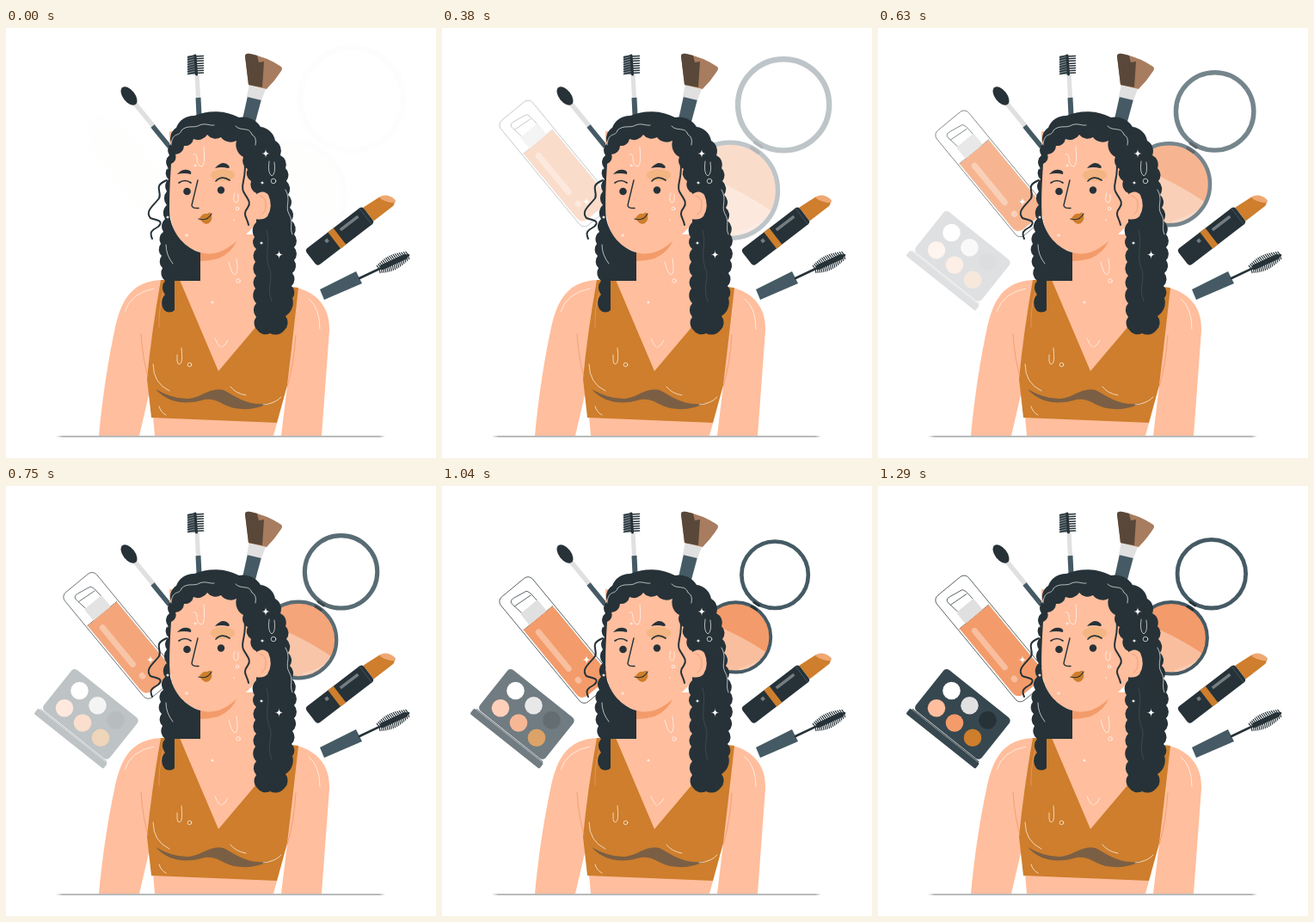
Write an HTML page that moves like this. It is 500x500 px and loops after 1.33 s.

```html
<!DOCTYPE html>
<html lang="en">
<head>
<meta charset="utf-8">
<title>Makeup</title>
<style>
html, body { margin: 0; height: 100%; overflow: hidden; background: #fff }
svg { display: block; width: 100vw; height: 100vh }
.line { fill: none; stroke: #263238; stroke-linecap: round; stroke-linejoin: round }
.wet { fill: none; stroke: #fff; stroke-width: .9; stroke-linecap: round; opacity: .75 }
.fold { fill: none; stroke: #eb996e; stroke-width: .8; stroke-linecap: round }
.ink { fill: #263238 } .steel { fill: #455a64 } .silver { fill: #e0e0e0 }
.skin { fill: #ffbe9d } .coral { fill: #f39b6a } .gold { fill: #ce7e2c }
</style>
</head>
<body>
<svg viewBox="0 0 500 500">
<defs><clipPath id="pan"><circle cx="341" cy="177" r="42"/></clipPath></defs>

<g id="compact">
  <circle cx="388" cy="102" r="40" fill="#fff" stroke="#455a64" stroke-width="4.800"/>
  <circle cx="341" cy="177" r="42" class="coral"/>
  <g clip-path="url(#pan)" fill="#fff">
    <path d="M300 157Q345 171 390 204V230H300Z" opacity=".35"/>
    <path d="M345 214Q370 208 390 188V230H340Z" opacity=".2"/>
  </g>
  <circle cx="341" cy="177" r="42" fill="none" stroke="#455a64" stroke-width="4"/>
  <path class="line" d="M363 135l6 4M360 140l6 4" stroke-width="3"/>
</g>

<g id="bottle">
  <g transform="translate(64 131.500) rotate(-39.500)">
    <rect width="48" height="158" rx="7" fill="#fff" stroke="#263238" stroke-width=".7"/>
    <path class="line" d="M2 46H46M13 29L11 14Q11 9 17 10L33 13Q36 14 36 29M12 18L34 20" stroke-width=".7"/>
    <rect x="11" y="29" width="26" height="17" rx="2" class="silver"/>
    <path class="coral" d="M2 46H46V142Q46 152 36 152H12Q2 152 2 142Z"/>
    <path d="M14 59V114M14 131V132" fill="none" stroke="#fff" stroke-width="7" stroke-linecap="round" opacity=".35"/>
  </g>
</g>

<g id="palette">
  <g transform="translate(79 211) rotate(38.500)">
    <rect width="98" height="61" rx="5" fill="#37474f"/>
    <rect x="-3" y="63" width="103" height="8" rx="1.500" fill="#37474f"/>
    <path class="line" d="M0 62H98" stroke-width="1"/>
  </g>
  <g id="pans"></g>
</g>

<g id="applicator">
  <path d="M150 88L172 115" stroke="#e0e0e0" stroke-width="5.500"/>
  <path d="M170.500 114L190 138" stroke="#455a64" stroke-width="5.500"/>
  <ellipse rx="7" ry="12.500" transform="translate(143 79) rotate(-38)" class="ink"/>
</g>
<g id="comb">
  <path d="M222 54L223.500 81" stroke="#e0e0e0" stroke-width="5"/>
  <path d="M223.500 81L224.500 102" stroke="#455a64" stroke-width="6"/>
  <path d="M211 32.500L220 32 221 54 211.500 54Z" fill="#78848a"/>
  <path class="line" d="M220 32L221.500 54" stroke-width="3"/>
  <path id="teeth" class="line" stroke-width="1.500"/>
</g>
<g id="brush">
  <path class="steel" d="M281 79L297 83 290 109 275 106Z"/>
  <path class="silver" d="M283 65L302 71 297 84 280 80Z"/>
  <path d="M278 33Q278 29 284 30Q304 34 320 45Q322 47 320 50Q313 61 303 71L282 66Z" fill="#a87c5e"/>
  <path d="M278 33Q278 29 284 30L292 32 294 40 300 39Q299 54 298 69L282 66Z" fill="#594839"/>
</g>
<g id="lipstick" transform="translate(348 259) rotate(-37.500)">
  <path class="gold" d="M84 1L106 3Q119 7 118 18L113 21H84Z"/>
  <path d="M106 3Q117 4 119 17Q117 21 112 15Q106 8 106 3Z" fill="#efa873"/>
  <rect y="-1" width="84" height="24" rx="4" class="ink"/>
  <rect x="34" y="-1" width="8" height="24" class="gold"/>
  <rect x="47" y="4" width="26" height="3.500" fill="#747d81"/>
  <rect x="25" y="4" width="4" height="4" fill="#747d81"/>
  <path d="M80 -1V23" stroke="#455a64" stroke-width=".8"/>
</g>
<g id="mascara">
  <path class="steel" d="M365 304L407 283 414 297 370 316Z"/>
  <path class="line" d="M411 291L468 264" stroke-width="2.600"/>
  <path class="line" d="M438 278L464 266" stroke-width="6"/>
  <path id="bristles" class="line" stroke-width="1.200"/>
</g>

<path d="M58 475L66 474H434L441 475 434 476H66Z" fill="#b8babb"/>

<g id="body">
  <path class="skin" d="M108 474C112 430 119 385 127 348C135 313 148 295 180 293H226V240H292V296L338 302C362 308 377 325 376 352L367 474H320L327 416 311 474H173L168 418 155 474Z"/>
  <path class="gold" d="M180 293H202L247 399 330 301 340 302Q333 365 327 415L315 459 169 453 164 408Q169 355 180 293Z"/>
  <path d="M174 420Q195 432 213 431C228 429 238 417 253 421C270 430 284 441 306 436Q288 446 265 442C249 437 244 430 231 432Q195 443 174 420Z" fill="#7b5f44"/>
  <path class="fold" d="M157 356Q159 385 165 405M337 357Q335 390 327 417M183 305Q177 330 178 348"/>
  <path class="wet" d="M138 330Q145 308 172 303M352 315Q365 325 365 350M171 391Q171 413 190 422M261 417Q267 425 279 427M299 438Q313 437 320 429M178 440Q180 447 186 450M243 361Q245 367 249 371M258 363Q256 368 251 371M199 380V387Q199 391 202 391Q206 390 204 372"/>
  <circle class="wet" cx="213.500" cy="391.500" r="2.300"/>
</g>

<g id="head">
  <path class="coral" d="M226 255L269 246Q263 261 247 268Q237 271 226 271Z"/>
  <path class="skin" d="M190 120H292V226Q281 240 268 248C250 264 236 264 226 261C200 252 190 235 190 200Z"/>
  <path id="hair" class="ink"/>
  <path class="skin" d="M290 194Q299 187 305 194Q311 207 304 219Q299 224 290 222Z"/>
  <path class="fold" d="M295 195Q303 197 302 207Q302 214 297 217"/>
  <path class="line" d="M187 177C170 184 182 190 178 198C172 206 161 213 168 221C176 224 184 224 177 231C168 236 167 238 170 245" stroke-width="2"/>
  <path class="line" d="M277 150C281 175 272 181 276 190C280 198 286 202 281 209C274 217 281 221 282 229" stroke-width="2"/>
  <path class="wet" d="M192 136C193 120 202 127 204 119C211 112 219 117 225 113C232 110 237 114 242 113M267 114C273 121 283 114 286 124Q292 127 290 136M325 188C332 200 324 207 329 216C335 226 329 231 333 240M186 252Q186 264 194 274M306 155Q304 169 309 172Q314 170 312 156"/>
  <path class="wet" d="M303 235C308 252 300 262 306 279C312 290 302 300 309 318" style="opacity:.12"/>
  <circle class="wet" cx="311" cy="178" r="2.800"/>

  <ellipse cx="252" cy="171" rx="14" ry="7" fill="#f3b582"/>
  <g class="ink">
    <circle cx="210.500" cy="190" r="4.300"/><circle cx="250" cy="188.500" r="4.200"/>
    <path d="M199 170Q206 162 214 166Q216 168 215 170Q207 168 199 170ZM243 163Q252 153 259 160Q261 163 258 163Q251 161 243 163Z"/>
  </g>
  <path class="line" d="M201 180Q208 175 215 180M244 178Q251 171 260 177" stroke-width="1.700"/>
  <path class="line" d="M223 177L216 206Q216 210 224 209.500" stroke-width="1.400"/>
  <path class="gold" d="M225 221Q229 215 234 216Q238 213 239 217Q241 226 233 228Q228 227 225 221Z"/>
  <path class="line" d="M224 222Q234 225 239 216" stroke-width="1.200"/>
  <path class="wet" d="M218 147Q221 145 222 151Q222 161 228 161Q232 159 230 138M266 192Q263 201 267 203Q271 204 270 193M259 272Q262 285 266 287Q271 286 268 268M265 222v2"/>
  <circle class="wet" cx="270" cy="294" r="2.300"/>
  <circle class="wet" cx="269" cy="210" r="1.800"/>
  <circle class="wet" cx="210" cy="241" r="1.300"/>
  <circle class="wet" cx="220" cy="160" r="1"/>
</g>
<path id="stars" fill="#fff"/>
</svg>

<script>
const $ = id => document.getElementById(id);
const draw = (id, d) => $(id).setAttribute('d', d);

// Joins points with arcs that bulge to the left of travel; wide gaps get flatter arcs.
function scallop(x, y, list) {
  const n = list.trim().split(/[\s,]+/).map(Number);
  let d = `L${x} ${y}`;
  for (let i = 0; i < n.length; i += 2) {
    const gap = Math.hypot(n[i] - x, n[i + 1] - y), r = .55 * gap + .012 * gap * gap;
    [x, y] = [n[i], n[i + 1]];
    d += `A${r} ${r} 0 0 1 ${x} ${y}`;
  }
  return d;
}

draw('hair', 'M196 294' +
  scallop(196, 328, `184,328 185,310 185,294 182,279 181,265 180,251 183,237 185,222 187,206
    187,190 189,176 188,162 190,148 192,134 198,116 219,102 271,104 296,115 313,131 319,148
    325,163 326,178 328,194 330,209 332,224 335,240 335,255 335,270 333,285 332,300 333,314
    325,335 324,351 307,355 292,351 291,336 291,320 290,303 291,288 290,272 291,257 289,243 291,226`) +
  scallop(291, 192, '285,178 281,164 276,150 268,131 250,127 234,124 218,129 207,137 197,147 192,158') +
  'C191 175 189 205 191 222C195 240 208 256 226 261V294Z');

draw('stars', [[302, 146, 5], [317.5, 263.5, 5], [298, 180, 2.7], [297, 250, 2.7], [187, 163, 2.7],
  [188, 220, 2.7], [168, 202, 5], [240, 319, 2.2]].map(([x, y, s]) =>
  `M${x} ${y - s}Q${x} ${y} ${x + s} ${y}Q${x} ${y} ${x} ${y + s}Q${x} ${y} ${x - s} ${y}Q${x} ${y} ${x} ${y - s}Z`).join(''));

let teeth = '', bristles = '';
for (let i = 0; i < 8; i++) {
  const y = 33 + i * 2.8;
  teeth += `M220 ${y}L229.500 ${y - .5}M211.500 ${y + 1}L219 ${y - 1}`;
}
for (let i = 0; i < 17; i++) {
  const x = 434 + i * 2.1, y = 280 - i, h = 4 + 5 * Math.sin(Math.PI * (i + 1) / 18);
  bristles += `M${x - h * .55} ${y - h * .75}L${x} ${y}L${x + h * .2} ${y + h * .95}`;
}
draw('teeth', teeth);
draw('bristles', bristles);

$('pans').innerHTML = ['#fff', '#e0e0e0', '#263238', '#ffbe9d', '#f39b6a', '#ce7e2c'].map((color, i) => {
  const col = i % 3, row = i / 3 | 0, x = 85.5 + 21 * col - 17.5 * row, y = 238 + 17.2 * col + 20.3 * row;
  return `<circle cx="${x}" cy="${y}" r="10.300" fill="${color}"/>
    <path d="M${x - 9} ${y + 5}A10.300 10.300 0 1 1 ${x + 9} ${y - 5}A10.300 10 0 0 0 ${x - 9} ${y + 5}" fill="#263238" opacity=".13"/>`;
}).join('');

const clamp = v => Math.min(1, Math.max(0, v));
const bezier = (u, a, b) => 3 * (1 - u) * (1 - u) * u * a + 3 * (1 - u) * u * u * b + u * u * u;

// cubic-bezier(.36, -.01, .5, 1.38): overshoots before settling
function overshoot(x) {
  let lo = 0, hi = 1;
  for (let i = 0; i < 20; i++) {
    const mid = (lo + hi) / 2;
    if (bezier(mid, .36, .5) < x) lo = mid; else hi = mid;
  }
  return bezier(lo, -.01, 1.38);
}

function frame() {
  const time = performance.now() % 1330;
  const p = overshoot(clamp((time + 40) / 1350));
  $('compact').setAttribute('transform', `translate(360 141) scale(${1.5 - .5 * p}) translate(-360 -141)`);
  $('bottle').setAttribute('transform', `translate(0 ${30 * (p - 1)})`);
  $('compact').setAttribute('opacity', clamp(p));
  $('bottle').setAttribute('opacity', clamp(p));
  $('palette').setAttribute('opacity', clamp((time - 510) / 750));
  requestAnimationFrame(frame);
}
frame();
</script>
</body>
</html>
```
